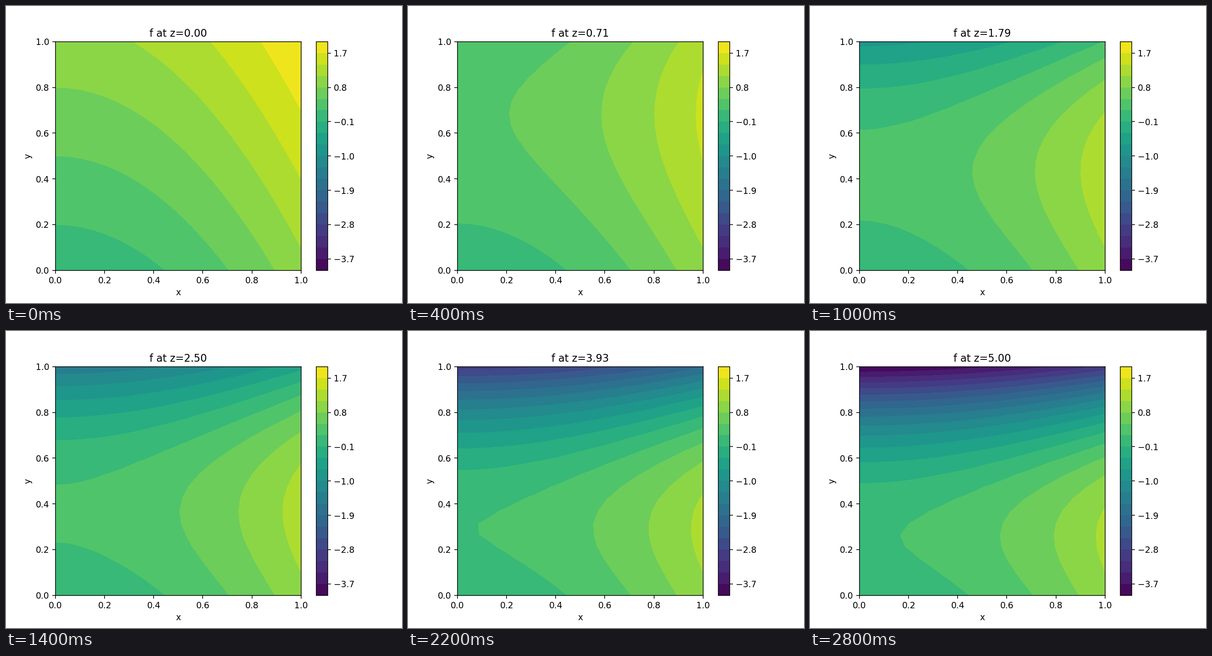
These frames come from a looping animation (864x648 px, 3000 ms). A matplotlib script:

```python
import matplotlib.pyplot as plt
import numpy as np
from matplotlib.animation import FuncAnimation

STEPS = 15
INTERVAL = 200
LEVELS = np.linspace(-4, 2, 21)

grid = np.linspace(0, 1, 20)
X, Y = np.meshgrid(grid, grid)
depths = np.linspace(0, 5, STEPS)

fig, ax = plt.subplots(figsize=(6.4, 4.8), dpi=135)


def f(x, y, z):
    return x**2 + y - z * y**3


def draw(i):
    z = depths[i]
    ax.clear()
    filled = ax.contourf(X, Y, f(X, Y, z), levels=LEVELS, cmap="viridis")
    ax.set_xlabel("x")
    ax.set_ylabel("y")
    ax.set_title(f"f at z={z:.2f}")
    return filled


fig.colorbar(draw(0), ax=ax)


def update(i):
    draw(i)
    return []


anim = FuncAnimation(fig, update, frames=STEPS, interval=INTERVAL,
                     repeat=True, repeat_delay=0, blit=False)
plt.show()
```
